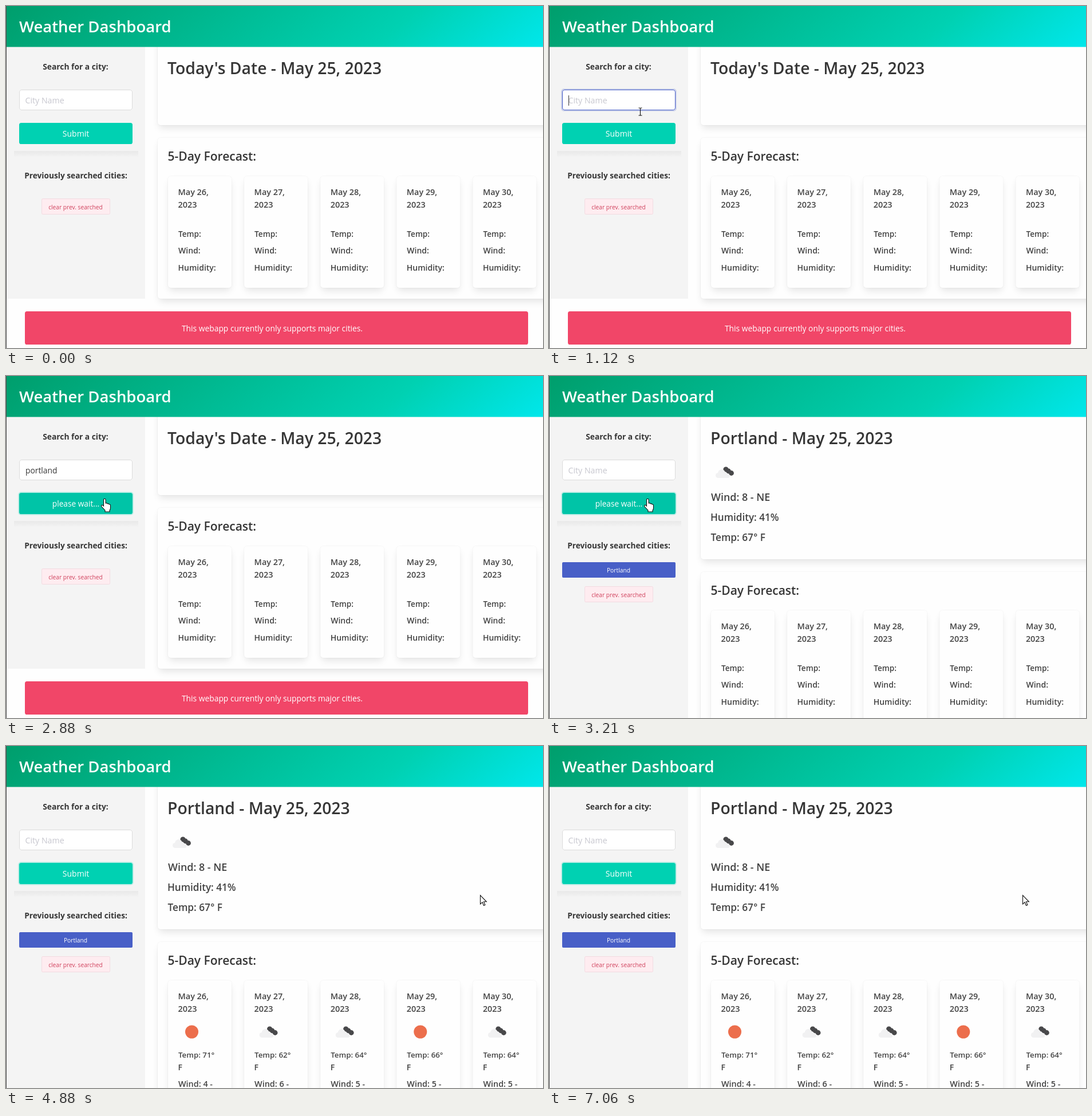
Write an HTML page with a canvas that moves like this. It is 938 px wide and 597 px high and loops after 7160 ms.

```html
<!DOCTYPE html>
<html lang="en">
<head>
<meta charset="utf-8">
<title>Weather Dashboard</title>
<style>
html, body { margin: 0; width: 100%; height: 100%; overflow: hidden; background: #fefefe; }
canvas { display: block; }
</style>
</head>
<body>
<canvas id="stage" width="938" height="597"></canvas>
<script>
const ctx = document.getElementById('stage').getContext('2d');
const LOOP = 7160;
const FAMILY = '"Open Sans", "Noto Sans", sans-serif';
const INK = '#363636';
const SOFT = '#434343';
const BG = '#fefefe';

// Moments of the story, in ms
const FOCUS = 1040, TYPE = 1400, KEY = 140, CLICK = 2840, RESULT = 2960, CARDS = 3600, READY = 3700;

const cursorKeys = [
  [700, 400, 602], [1020, 159, 184], [2450, 159, 184], [2800, 172, 214],
  [3400, 172, 214], [4000, 345, 321], [4800, 828, 260], [6500, 828, 260], [6640, 827, 260]
];

const days = [
  { date: 'May 26,', sun: true, temp: 71, wind: 4 },
  { date: 'May 27,', sun: false, temp: 62, wind: 6 },
  { date: 'May 28,', sun: false, temp: 64, wind: 5 },
  { date: 'May 29,', sun: true, temp: 66, wind: 5 },
  { date: 'May 30,', sun: false, temp: 64, wind: 5 }
];

const arrow = new Path2D('M0 0V15.5L3.6 12.2 6 18 8.4 17 6 11.3H10.8Z');
const hand = new Path2D('M4.5 13V2.5a1.8 1.8 0 0 1 3.6 0V8.5q3-.6 3.4 1 2.2-.5 2.7 1 2.3-.2 2.3 2V17q0 2-1.5 4v2.5H7V21L1 14.5q-1-2 .6-2.7 1.4-.4 2.9 1.7Z');
const beam = new Path2D('M-3 -6.5H-1Q0 -6.5 0 -5.5V5.5Q0 6.5 -1 6.5H-3M3 -6.5H1Q0 -6.5 0 -5.5M0 5.5Q0 6.5 1 6.5H3');

function text(str, x, y, size, weight = 600, color = INK, align = 'left') {
  ctx.font = `${weight} ${size}px ${FAMILY}`;
  ctx.fillStyle = color;
  ctx.textAlign = align;
  ctx.fillText(str, x, y);
}

function rect(x, y, w, h, r, fill, stroke) {
  ctx.beginPath();
  ctx.roundRect(x, y, w, h, r);
  ctx.fillStyle = fill;
  ctx.fill();
  if (stroke) {
    ctx.beginPath();
    ctx.roundRect(x + 0.5, y + 0.5, w - 1, h - 1, r);
    ctx.strokeStyle = stroke;
    ctx.lineWidth = 1;
    ctx.stroke();
  }
}

function box(x, y, w, h) {
  ctx.save();
  ctx.shadowColor = 'rgba(10,10,10,0.1)';
  ctx.shadowBlur = 13;
  ctx.shadowOffsetY = 7;
  rect(x + 2, y + 2, w - 4, h - 4, 5, BG);
  ctx.restore();
  rect(x - 1, y - 1, w + 2, h + 2, 6, 'rgba(10,10,10,0.025)');
  rect(x, y, w, h, 5, BG);
}

function disc(x, y, r) {
  ctx.beginPath();
  ctx.arc(x, y, r, 0, Math.PI * 2);
  ctx.fill();
}

function cloud(x, y) {
  ctx.fillStyle = '#48484a';
  disc(x + 3, y - 5, 4.6);
  disc(x + 7.5, y - 2, 4.4);
  disc(x + 12.5, y + 1.5, 4.4);
  ctx.fillStyle = '#f1f1f2';
  disc(x - 4.5, y + 1.5, 6.5);
  disc(x - 10.5, y + 5.5, 4.5);
  disc(x + 2, y + 5, 4.2);
  disc(x + 6, y + 6.5, 3.5);
  ctx.fillRect(x - 10.5, y + 4, 16.5, 6);
}

function sun(x, y) {
  ctx.fillStyle = '#ec6e4c';
  disc(x, y, 11.5);
}

function header() {
  // 141 degree gradient across the bar
  const a = 141 * Math.PI / 180, dx = Math.sin(a), dy = -Math.cos(a);
  const half = (937 * dx + 72 * dy) / 2;
  const g = ctx.createLinearGradient(469.5 - dx * half, 36 - dy * half, 469.5 + dx * half, 36 + dy * half);
  g.addColorStop(0, '#009e6c');
  g.addColorStop(0.71, '#00d1b2');
  g.addColorStop(1, '#00e7eb');
  ctx.fillStyle = g;
  ctx.fillRect(0, 0, 938, 71.5);
  text('Weather Dashboard', 23, 46, 27.5, 600, '#fff');
}

function searchInput(t) {
  const focused = t >= FOCUS && t < CLICK;
  if (focused) rect(21.2, 144.2, 201.6, 39.6, 5, 'rgba(72,95,199,0.25)');
  rect(23, 146, 198, 36, 3.6, '#fff', focused ? '#485fc7' : '#dbdbdb');
  const count = t < RESULT ? Math.max(0, Math.floor((t - TYPE) / KEY) + 1) : 0;
  const typed = 'portland'.slice(0, count);
  if (typed) text(typed, 34, 170, 13.8, 400);
  else text('City Name', 33.5, 170, 14.2, 400, '#c7c7cf');
  if (focused) {
    const w = typed ? ctx.measureText(typed).width : 0;
    ctx.fillStyle = INK;
    ctx.fillRect(Math.round(34 + w), 156, 1, 18);
  }
}

function submitButton(t, cur) {
  const waiting = t >= CLICK && t < READY;
  if (t >= CLICK) rect(21.2, 202.2, 201.6, 40.6, 5, 'rgba(0,209,178,0.25)');
  rect(23, 204, 198, 37, 3.6, cur && cur.kind === 'hand' ? '#00c4a7' : '#00d1b2');
  if (waiting) text('please wait...', 122, 228, 13.7, 400, '#fff', 'center');
  else text('Submit', 122, 228, 14, 400, '#fff', 'center');
}

function sidebar(t, cur) {
  const found = t >= RESULT;
  ctx.fillStyle = '#f4f4f4';
  ctx.fillRect(0, 71, 243, found ? 526 : 440);

  text('Search for a city:', 121.5, 111, 13.8, 700, INK, 'center');
  searchInput(t);
  submitButton(t, cur);

  const g = ctx.createLinearGradient(0, 252, 0, 264);
  g.addColorStop(0, '#e9e9e9');
  g.addColorStop(0.5, '#ededed');
  g.addColorStop(1, '#f4f4f4');
  ctx.fillStyle = g;
  ctx.fillRect(14, 253, 217, 11);

  text('Previously searched cities:', 122, 301, 13.7, 700, INK, 'center');
  if (found) {
    rect(23, 325, 198, 27, 2, '#485fc7');
    text('Portland', 121.5, 343, 10.3, 400, '#fff', 'center');
  }
  const y = found ? 367 : 336;
  rect(62, y, 120, 28, 2, '#feecf0', '#f2dbe1');
  text('clear prev. searched', 121.5, y + 18.5, 10.2, 400, '#d0405c', 'center');
}

function today(t) {
  const found = t >= RESULT;
  box(265, 50, 700, found ? 270 : 158);
  text(found ? 'Portland - May 25, 2023' : "Today's Date - May 25, 2023", 282, 119, 28.3);
  if (!found) return;
  cloud(306, 168);
  text('Wind: 8 - NE', 283, 218, 17.9, 600, SOFT);
  text('Humidity: 41%', 282, 253, 17.1, 600, SOFT);
  text('Temp: 67° F', 282.5, 288, 17.2, 600, SOFT);
}

function card(day, x, y, filled) {
  const tx = x + 18;
  const line = (str, dx, dy, size) => text(str, tx + dx, y + dy, size, 600, SOFT);
  box(x, y, 111, filled ? 240 : 195);
  line(day.date, -0.5, 33, 14.4);
  line('2023', -0.5, 55, 14.4);
  if (!filled) {
    line('Temp:', 0, 106, 13.6);
    line('Wind:', 0, 135, 14);
    line('Humidity:', -0.5, 165, 14);
    return;
  }
  (day.sun ? sun : cloud)(x + 41.5, y + 90);
  line(`Temp: ${day.temp}°`, 0, 135, 13.3);
  line('F', -0.5, 157, 14);
  line(`Wind: ${day.wind} -`, 0, 186, 14.4);
}

function forecast(t) {
  const shift = t >= RESULT ? 112 : 0;
  const filled = t >= CARDS;
  box(265, 230 + shift, 700, filled ? 400 : 281);
  text('5-Day Forecast:', 282.5, 270 + shift, 21);
  days.forEach((day, i) => card(day, 283 + i * 133.1, 297 + shift, filled));
}

function banner() {
  rect(33, 533, 879, 58, 3.6, '#f14668');
  text('This webapp currently only supports major cities.', 465, 568, 13.82, 400, '#fff', 'center');
}

function cursorAt(t) {
  if (t < cursorKeys[0][0]) return null;
  const i = cursorKeys.findIndex(k => k[0] > t);
  let [, x, y] = cursorKeys[cursorKeys.length - 1];
  if (i > 0) {
    const [t0, x0, y0] = cursorKeys[i - 1], [t1, x1, y1] = cursorKeys[i];
    const p = (t - t0) / (t1 - t0), e = p * p * (3 - 2 * p);
    x = x0 + (x1 - x0) * e;
    y = y0 + (y1 - y0) * e;
  }
  const inside = (top, bottom) => x >= 23 && x <= 221 && y >= top && y <= bottom;
  const kind = inside(146, 185) ? 'beam' : inside(204, 241) ? 'hand' : 'arrow';
  return { x: Math.round(x), y: Math.round(y), kind };
}

function drawCursor({ x, y, kind }) {
  ctx.save();
  ctx.translate(x + 0.5, y + 0.5);
  ctx.strokeStyle = '#111';
  ctx.lineWidth = 1.1;
  if (kind === 'beam') {
    ctx.stroke(beam);
  } else {
    if (kind === 'hand') ctx.translate(-6.5, -1);
    const shape = kind === 'hand' ? hand : arrow;
    ctx.fillStyle = '#fff';
    ctx.fill(shape);
    ctx.stroke(shape);
  }
  ctx.restore();
}

function draw(t) {
  const cur = cursorAt(t);
  ctx.fillStyle = BG;
  ctx.fillRect(0, 0, 938, 597);
  today(t);
  forecast(t);
  sidebar(t, cur);
  header();
  if (t < RESULT) banner();
  ctx.fillStyle = '#4a4a4a';
  ctx.fillRect(0, 0, 1, 597);
  if (cur) drawCursor(cur);
}

const start = performance.now();
function tick() {
  draw((performance.now() - start) % LOOP);
  requestAnimationFrame(tick);
}
tick();
</script>
</body>
</html>
```
